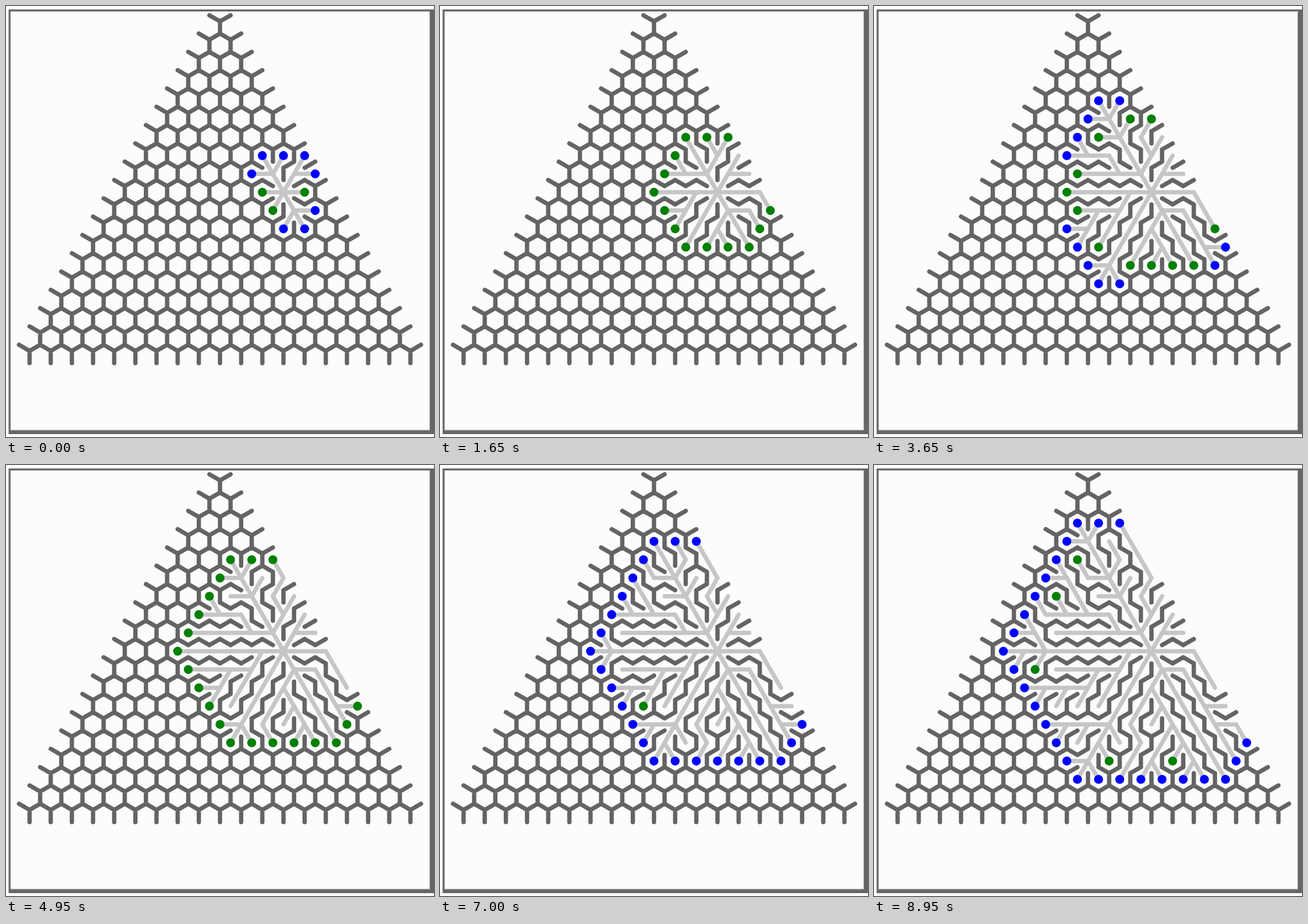
These frames come from a looping animation (745x751 px, 9000 ms). An HTML page with a canvas:

```html
<!DOCTYPE html>
<html lang="en">
<head>
<meta charset="utf-8">
<title>Maze growing on a triangular grid</title>
<style>
  html, body { margin: 0; width: 100%; height: 100%; overflow: hidden; background: #fff; }
  canvas { display: block; }
</style>
</head>
<body>
<canvas id="stage" width="745" height="751"></canvas>
<script>
const ctx = document.getElementById('stage').getContext('2d');

const ROWS = 20, PITCH = 36.83, ROW_HEIGHT = PITCH * Math.sqrt(3) / 2;
const APEX_X = 372.5, APEX_Y = 5.5;
const LOOP = 9000, FRAME = 50, FRAMES_PER_CELL = 2.14, HEAD_START = 4;
const WALL = '#646464', PATH = '#c6c6c6', ACTIVE = '#008000', FOUND = '#0000ff';

// Random order in which each ring around the start is expanded,
// as counter-clockwise positions within that ring.
const RING_ORDERS = [
  [0],
  [1, 0, 4, 2, 3, 5],
  [2, 11, 4, 6, 10, 8, 0, 3, 5, 7, 9, 1],
  [2, 10, 13, 6, 3, 1, 12, 4, 9, 0, 7, 5, 11, 8],
  [2, 8, 15, 4, 10, 13, 0, 5, 7, 11, 3, 14, 12, 1, 6, 16, 9],
  [5, 16, 18, 9, 0, 7, 15, 11, 4, 14, 1, 12, 3, 17, 8, 6, 19, 2, 13, 10],
  [4, 7, 10, 12, 14, 17, 19, 2, 0, 22, 8, 6, 16, 21, 1, 11, 13, 20]
];

// Cells form a triangle; each one starts out walled off from its neighbours.
const grid = [], cells = [], walls = [];
for (let row = 0; row < ROWS; row++) {
  grid[row] = [];
  for (let col = 0; col <= row; col++) {
    const cell = {
      x: APEX_X + (col - row / 2) * PITCH,
      y: APEX_Y + row * ROW_HEIGHT,
      neighbours: [], parent: null, depth: Infinity, foundAt: Infinity, doneAt: Infinity
    };
    grid[row][col] = cell;
    cells.push(cell);
    const before = [grid[row][col - 1], grid[row - 1]?.[col - 1], grid[row - 1]?.[col]];
    for (const other of before.filter(Boolean)) {
      cell.neighbours.push(other);
      other.neighbours.push(cell);
      walls.push([cell, other]);
    }
  }
}

const start = grid[10][8];
start.depth = start.foundAt = 0;

function ringAngle(cell) {
  const angle = Math.atan2(start.y - cell.y, cell.x - start.x) - 25 * Math.PI / 180;
  return (angle + 4 * Math.PI) % (2 * Math.PI);
}

// Grow the maze once, noting the step at which every cell is found and expanded.
let step = 0;
RING_ORDERS.forEach((order, depth) => {
  const ring = cells.filter(c => c.depth === depth).sort((a, b) => ringAngle(a) - ringAngle(b));
  for (const index of order) {
    const cell = ring[index];
    cell.doneAt = ++step;
    for (const next of cell.neighbours) {
      if (next.depth < Infinity) continue;
      Object.assign(next, { parent: cell, depth: depth + 1, foundAt: step });
    }
  }
});

function rect(color, left, top, right, bottom) {
  ctx.fillStyle = color;
  ctx.fillRect(left, top, right - left, bottom - top);
}

function strokeSegments(color, width, segments) {
  ctx.strokeStyle = color;
  ctx.lineWidth = width;
  ctx.lineCap = 'round';
  ctx.beginPath();
  for (const [x1, y1, x2, y2] of segments) {
    ctx.moveTo(x1, y1);
    ctx.lineTo(x2, y2);
  }
  ctx.stroke();
}

// The wall between two cells is perpendicular to the line joining them.
function wallSegment([a, b]) {
  const k = 1 / (2 * Math.sqrt(3));
  const mx = (a.x + b.x) / 2, my = (a.y + b.y) / 2;
  const px = (a.y - b.y) * k, py = (b.x - a.x) * k;
  return [mx - px, my - py, mx + px, my + py];
}

function draw(now) {
  const isOpen = ([a, b]) =>
    (a.parent === b && a.foundAt <= now) || (b.parent === a && b.foundAt <= now);

  rect('#fff', 0, 0, 745, 751);
  rect('#666', 4.5, 6, 745, 746);
  rect('#b0b0b0', 7.5, 9, 738, 739.5);
  rect('#fcfdfb', 8.5, 10, 737, 738.5);

  strokeSegments(PATH, 7.5, walls.filter(isOpen).map(([a, b]) => [a.x, a.y, b.x, b.y]));
  strokeSegments(WALL, 7.5, walls.filter(w => !isOpen(w)).map(wallSegment));

  const front = cells.filter(c => c.foundAt <= now && c.doneAt > now);
  const activeDepth = Math.min(...front.map(c => c.depth));
  for (const cell of front) {
    ctx.fillStyle = cell.depth === activeDepth ? ACTIVE : FOUND;
    ctx.beginPath();
    ctx.arc(cell.x, cell.y, 7.8, 0, 2 * Math.PI);
    ctx.fill();
  }
}

let shown = -1;
function tick() {
  const frame = Math.floor(performance.now() % LOOP / FRAME);
  const now = HEAD_START + Math.floor((frame + 1) / FRAMES_PER_CELL);
  if (now !== shown) draw(shown = now);
  requestAnimationFrame(tick);
}
tick();
</script>
</body>
</html>
```
